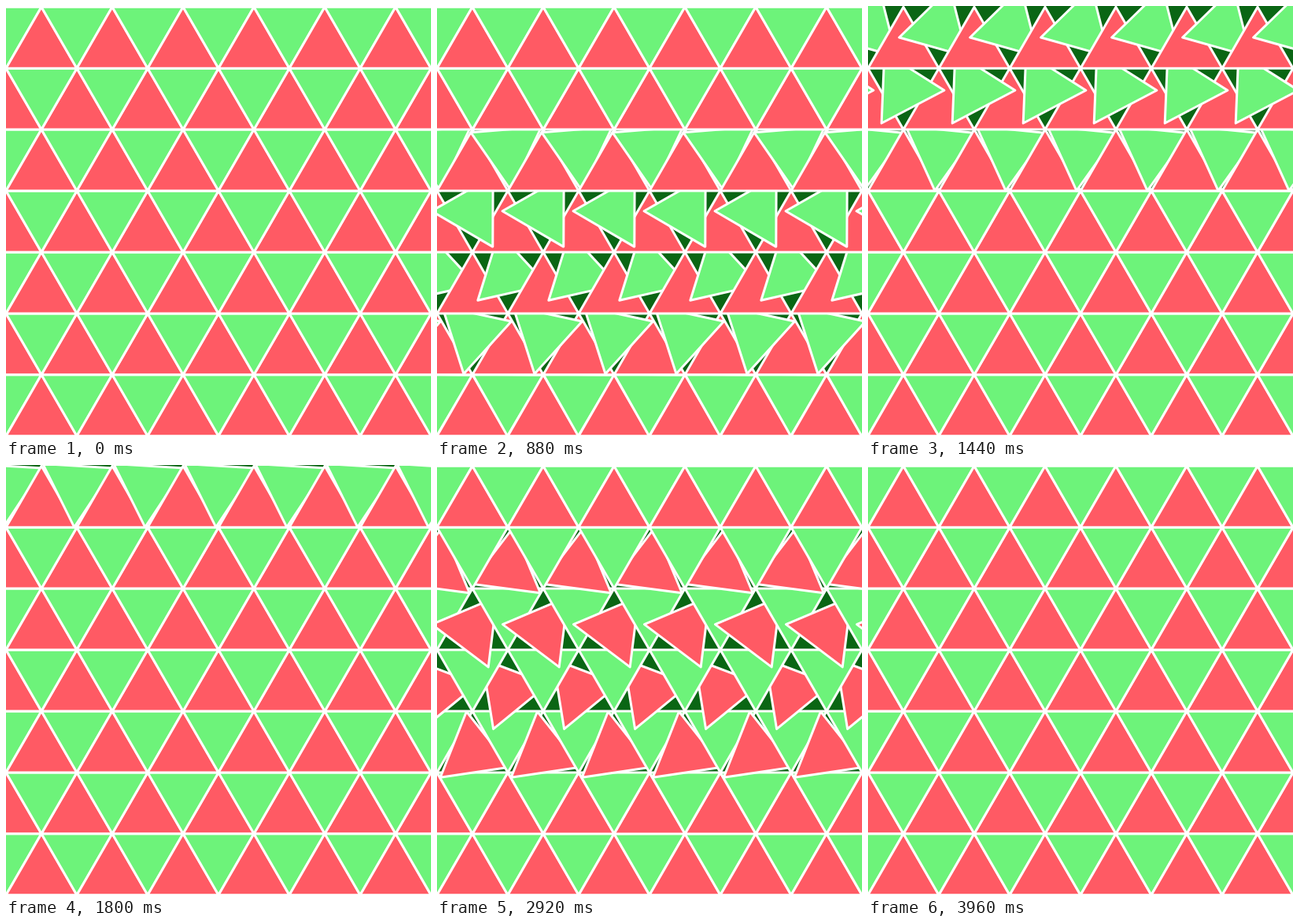
Animation, 540 px wide and 548 px high, one loop 4 s. Source, as an HTML page with a canvas:

```html
<!DOCTYPE html>
<html lang="en">
<head>
<meta charset="utf-8">
<title>Turning triangles</title>
<style>
  html, body { margin: 0; width: 100%; height: 100%; overflow: hidden; background: #0a6614; }
  canvas { display: block; }
</style>
</head>
<body>
<canvas id="stage" width="540" height="548"></canvas>
<script>
const W = 540, H = 548, LOOP = 4000;
const SIDE = 90, ROWS = 7;
const ROW_H = SIDE * Math.sqrt(3) / 2;
const RADIUS = SIDE / Math.sqrt(3);
const TOP = (H - ROWS * ROW_H) / 2;
const TURN = Math.PI * 2 / 3;
const TURN_MS = 1000, DELAY = 1000 / 6;
const GREEN = '#6df37a', RED = '#ff5a64', DARK = '#0a6614';

const ctx = document.getElementById('stage').getContext('2d');

const clamp = p => Math.min(1, Math.max(0, p));
const smooth = p => p * p * (3 - 2 * p);
const turnAt = ms => -TURN * smooth(smooth(clamp(ms / TURN_MS)));

function triangle(x, y, angle, color) {
  ctx.beginPath();
  for (let i = 0; i < 3; i++) {
    const a = angle + i * TURN;
    ctx.lineTo(x + RADIUS * Math.cos(a), y + RADIUS * Math.sin(a));
  }
  ctx.closePath();
  ctx.fillStyle = color;
  ctx.fill();
  ctx.stroke();
}

function drawRow(row, t) {
  const y = TOP + row * ROW_H;
  const downTurn = turnAt(t - (ROWS - 1 - row) * DELAY);
  const upTurn = turnAt(t - LOOP / 2 - row * DELAY);
  const down = x => triangle(x, y + RADIUS / 2, Math.PI / 2 + downTurn, GREEN);
  const up = x => triangle(x, y + RADIUS, -Math.PI / 2 + upTurn, RED);

  if (row % 2) {
    for (let x = -SIDE; x <= W + SIDE; x += SIDE) up(x);
    for (let x = -SIDE / 2; x <= W + SIDE; x += SIDE) down(x);
  } else {
    for (let x = -SIDE; x <= W + SIDE; x += SIDE) {
      down(x);
      up(x + SIDE / 2);
    }
  }
}

function draw(t) {
  ctx.fillStyle = DARK;
  ctx.fillRect(0, 0, W, H);
  ctx.strokeStyle = '#fff';
  ctx.lineWidth = 3;
  ctx.lineJoin = 'round';
  // Upper rows overlap the ones below.
  for (let row = ROWS - 1; row >= 0; row--) drawRow(row, t);
}

const start = performance.now();
function tick() {
  draw((performance.now() - start) % LOOP);
  requestAnimationFrame(tick);
}
tick();
</script>
</body>
</html>
```
